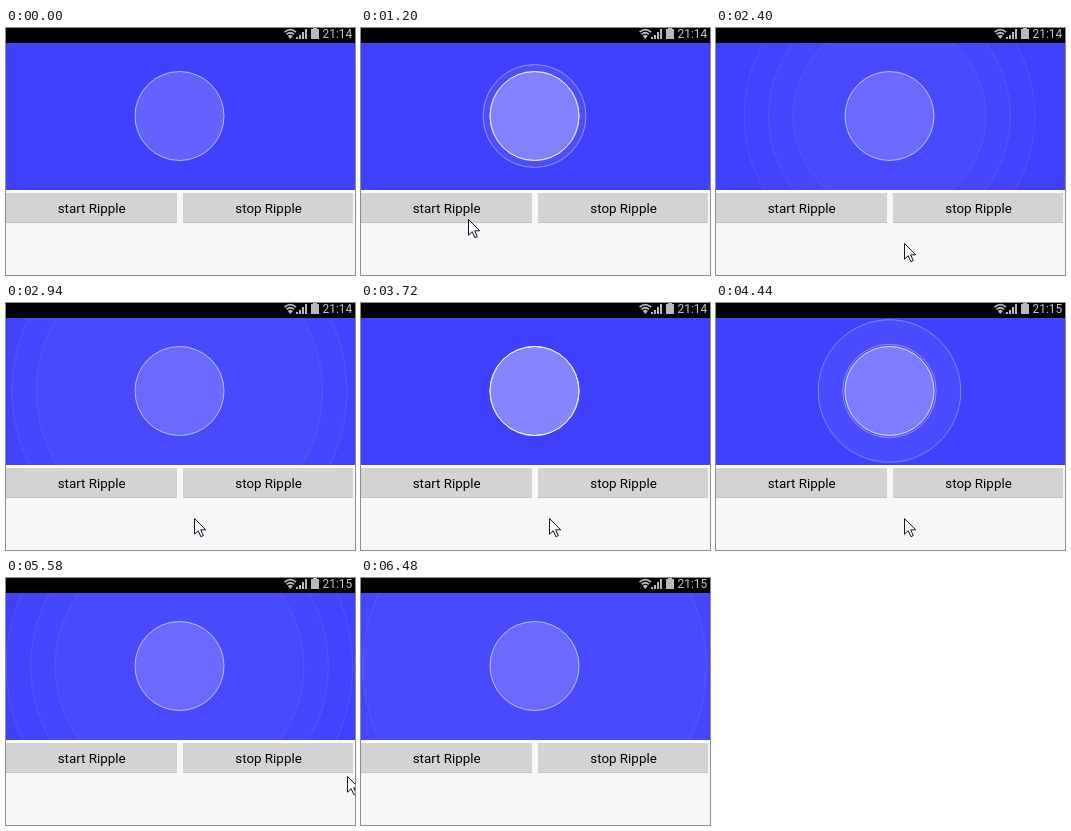
An HTML page that plays this animation: 349x247 px, repeating every 6600 ms.

```html
<!DOCTYPE html>
<html lang="en">
<head>
<meta charset="utf-8">
<title>Ripple</title>
<style>
  html, body { margin: 0; width: 100%; height: 100%; overflow: hidden; background: #f7f7f7; }
  svg { display: block; width: 349px; height: 247px; }
  text { font-family: Roboto, "Open Sans", sans-serif; }
  .label { font-size: 13.4px; text-anchor: middle; fill: #000; }
  #clock { font-size: 11.9px; fill: #c4c4c4; }
  .icon { fill: #b9b9b9; }
  .wave { fill: none; stroke: #b9b9b9; stroke-width: 1.8; }
  .disc { fill: #fff; stroke: #fff; stroke-width: 1; }
</style>
</head>
<body>
<svg viewBox="0 0 349 247">
  <defs><clipPath id="panel"><rect y="15" width="349" height="147"/></clipPath></defs>
  <rect width="349" height="247" fill="#f7f7f7"/>
  <rect y="162" width="349" height="3" fill="#fff"/>
  <rect width="349" height="15" fill="#000"/>

  <g>
    <path class="wave" d="M278.6 4.2Q284.3 -1 290 4.2M280.6 6.4Q284.3 3 288 6.4"/>
    <path class="icon" d="M281.8 8Q284.3 5.6 286.8 8L284.3 11Z"/>
    <path class="icon" d="M290 9h2v2h-2zM293 7h2v4h-2zM296 4h2v7h-2zM299 1h2v10h-2z"/>
    <path class="icon" d="M307 0h4v1h2v10h-8v-10h2z"/>
    <text id="clock" x="316.6" y="10.4">21:14</text>
  </g>

  <g clip-path="url(#panel)">
    <rect y="15" width="349" height="147" fill="#4040ff"/>
    <g id="rings"></g>
    <circle class="disc" cx="173.5" cy="88" r="44.5" fill-opacity=".18" stroke-opacity=".6"/>
  </g>

  <rect id="start" y="165" width="171" height="30" fill="#d3d3d3"/>
  <rect y="194" width="171" height="1" fill="#c3c3c3"/>
  <rect x="177" y="165" width="170" height="30" fill="#d3d3d3"/>
  <rect x="177" y="194" width="170" height="1" fill="#c3c3c3"/>
  <text class="label" x="85.7" y="184.5">start Ripple</text>
  <text class="label" x="262.5" y="184.5">stop Ripple</text>

  <path id="cursor" d="M.5 .5V16.2L4.2 12.7L6.9 18.7L9.3 17.6L6.7 11.8H11.7Z"
        fill="#fff" stroke="#111128" stroke-width="1"/>
</svg>
<script>
const LOOP = 6600, STEP = 60;
const BASE = 44.5, GAP = 24.5, TRAVEL = 177, PERIOD = 2875, FIRST = 834;

// Pointer positions: time, x, y
const path = [
  [60, 231, 100], [300, 57, 190], [480, 57, 190], [720, 107, 191],
  [1260, 107, 191], [1740, 187, 214], [2100, 187, 214], [2400, 188, 215],
  [5100, 188, 215], [5220, 197, 218], [5460, 318, 201], [5640, 352, 196]
];

const byId = id => document.getElementById(id);
const [group, cursor, startButton, clock] = ["rings", "cursor", "start", "clock"].map(byId);

const rings = [0, 1, 2].map(() => {
  const ring = document.createElementNS("http://www.w3.org/2000/svg", "circle");
  ring.setAttribute("class", "disc");
  ring.setAttribute("cx", 173.5);
  ring.setAttribute("cy", 88);
  return group.appendChild(ring);
});

function pointerAt(t) {
  const i = path.findIndex(p => p[0] > t);
  if (i < 1) return null;
  const [t0, x0, y0] = path[i - 1], [t1, x1, y1] = path[i];
  const k = (t - t0) / (t1 - t0);
  return [x0 + (x1 - x0) * k, y0 + (y1 - y0) * k].map(Math.round);
}

function drawRings(t) {
  group.style.display = t < FIRST ? "none" : "";
  if (t < FIRST) return;
  const phase = (t - FIRST) % PERIOD / PERIOD;
  const eased = (1 - Math.cos(Math.PI * phase)) / 2;
  const fade = Math.max(.2, (1 - eased) ** 2);
  rings.forEach((ring, i) => {
    ring.setAttribute("r", BASE + Math.max(0, eased * TRAVEL - i * GAP));
    ring.setAttribute("fill-opacity", .08 * fade);
    ring.setAttribute("stroke-opacity", .45 * fade);
  });
}

function draw(t) {
  drawRings(t);
  const spot = pointerAt(t);
  cursor.style.display = spot ? "" : "none";
  if (spot) cursor.setAttribute("transform", `translate(${spot})`);
  startButton.setAttribute("fill", t >= 720 && t < 840 ? "#9cc9da" : "#d3d3d3");
  clock.textContent = t < 3840 ? "21:14" : "21:15";
}

const origin = performance.now();
function tick() {
  const t = (performance.now() - origin) % LOOP;
  draw(Math.min(6480, Math.floor(t / STEP) * STEP));
  requestAnimationFrame(tick);
}
tick();
</script>
</body>
</html>
```
